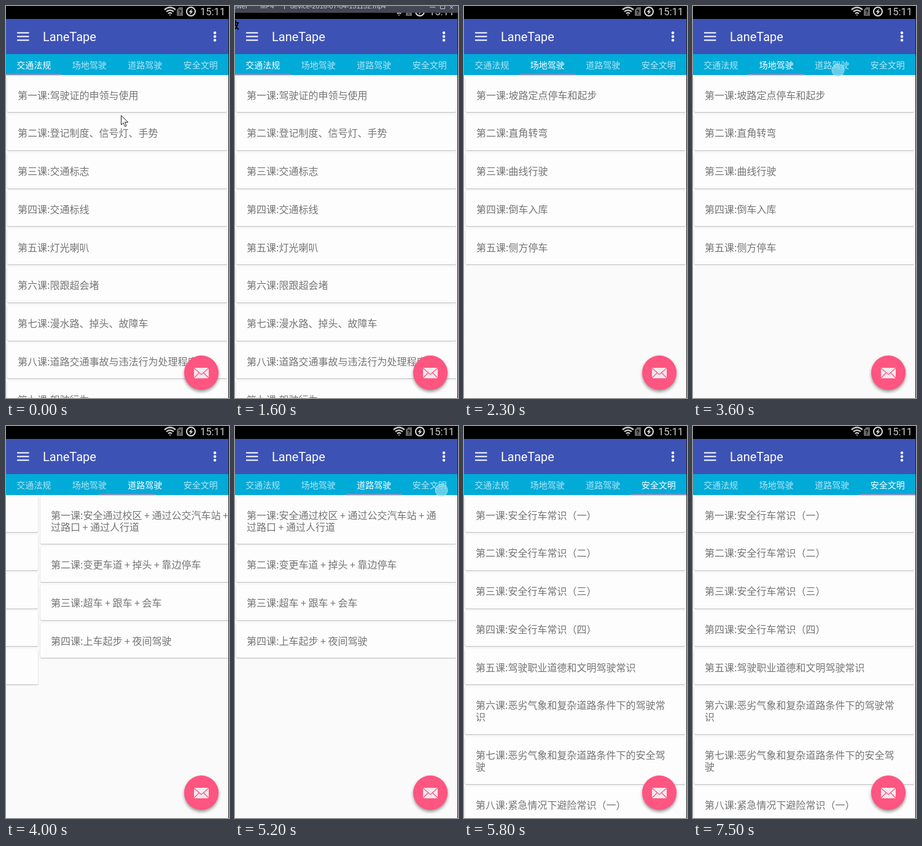
These frames come from a looping animation (363x636 px, 8000 ms). An HTML page:

```html
<!DOCTYPE html>
<html lang="zh-CN">
<head>
<meta charset="utf-8">
<title>Lessons</title>
<style>
  html, body { margin: 0; width: 100%; height: 100%; overflow: hidden; background: #fafafa; }
  #stage { position: absolute; left: 0; top: 0; width: 363px; height: 636px; overflow: hidden; background: #fafafa; }
  .page { position: absolute; left: 0; top: 115px; width: 362px; }
  .card {
    box-sizing: border-box; margin: 0 2px 4.75px; padding: 19.5px 0 18.5px 17px;
    border-radius: 2px; background: #fdfdfd; box-shadow: 0 1px 2px rgba(0, 0, 0, .27);
    font: 16px/19px "Noto Sans CJK SC", "Noto Sans CJK", sans-serif; color: #757575; white-space: pre;
  }
  .card span { font-family: "Noto Sans CJK TC", "Noto Sans CJK", sans-serif; line-height: 0; }
  svg { position: absolute; left: 0; top: 0; }
  .tab { font: 14px "Noto Sans CJK SC", "Noto Sans CJK", sans-serif; text-anchor: middle; fill: #fff; }
</style>
</head>
<body>
<div id="stage">
  <div id="pages"></div>
  <svg width="363" height="636" viewBox="0 0 363 636">
    <defs>
      <clipPath id="tabClip"><rect id="tabArea" y="78" width="90.5" height="34"/></clipPath>
      <filter id="soft" x="-30%" y="-30%" width="160%" height="160%"><feGaussianBlur stdDeviation="2.5"/></filter>
    </defs>

    <!-- Status bar -->
    <rect width="363" height="21" fill="#000"/>
    <g fill="none" stroke="#c8c8c8" stroke-width="2.400">
      <path d="M258 6Q267-1.500 276 6M261 9.200Q267 4.200 273 9.200M264 12.300Q267 9.800 270 12.300"/>
      <path d="M265.500 14H268.500L267 16Z" fill="#c8c8c8" stroke="none"/>
    </g>
    <path d="M282 2H288V16H278V6Z" fill="#666"/>
    <text x="280.500" y="14" font-family="Roboto, sans-serif" font-size="10" font-weight="700">?</text>
    <circle cx="301" cy="9" r="7" fill="none" stroke="#ddd" stroke-width="2"/>
    <path d="M303 4L297.500 10H300.500L299 14.500L304.500 8.500H301.500Z" fill="#ddd"/>
    <text x="316" y="15" font-family="Roboto, sans-serif" font-size="16.500" fill="#ccc">15:11</text>

    <!-- Toolbar -->
    <rect y="21" width="363" height="57" fill="#3d52b5"/>
    <path d="M18 43.500H37.500M18 49.500H37.500M18 55.500H37.500" stroke="#fff" stroke-width="2"/>
    <text x="60" y="57" font-family="Roboto, sans-serif" font-size="20" fill="#fff">LaneTape</text>
    <g fill="#fff">
      <circle cx="340" cy="43.500" r="2.200"/><circle cx="340" cy="49.500" r="2.200"/><circle cx="340" cy="55.500" r="2.200"/>
    </g>

    <!-- Tabs -->
    <rect y="78" width="363" height="34" fill="#00abd8"/>
    <circle id="ripple" cy="104" fill="#fff" fill-opacity=".18" clip-path="url(#tabClip)"/>
    <g id="tabs"></g>
    <rect id="indicator" y="111" width="90.500" height="1.500" fill="#dd85b4"/>
    <circle id="touch" cy="104" r="10" fill="#8edcf0" fill-opacity=".7" stroke="#b5ebf7" stroke-opacity=".8"/>

    <!-- Mail button -->
    <circle cx="318" cy="598" r="28" opacity=".4" filter="url(#soft)"/>
    <circle cx="318" cy="595" r="28" fill="#ff5581"/>
    <rect x="306" y="587" width="24" height="17" fill="#f3eaed"/>
    <path d="M306 587.500L318 598L330 587.500M306 603.500L314.500 595M330 603.500L321.500 595" fill="none" stroke="#ff5581" stroke-width="1.300"/>

    <rect x="362" width="1" height="636" fill="#1c1c1c"/>

    <!-- Player title bar -->
    <g id="player">
      <rect width="363" height="11" fill="#434754"/>
      <g font-family="Liberation Sans, sans-serif" font-size="11" fill="#c9cbd2">
        <text x="-3" y="4">ewer</text><text x="41" y="4">MP4</text>
        <text x="90" y="4">device-2016-07-04-151152.mp4</text>
      </g>
      <path d="M80.500 0V5M317 2H326M334.500 0V4.500H341.500V0M350 4.500L355 0M350 0L355 4.500" fill="none" stroke="#c9cbd2"/>
      <text x="-9" y="37" font-family="Noto Sans CJK SC, Noto Sans CJK, sans-serif" font-size="16" font-weight="700">放</text>
    </g>

    <path id="cursor" d="M.5 .5V16L4 12.500L6.500 18.500L9 17.500L6.500 11.500H11.500Z" fill="#fff" stroke="#222"/>
  </svg>
</div>
<script>
const LOOP = 8000, STEP = 100, PAGE_W = 362, TAB_W = 90.5;
const tabNames = ["交通法规", "场地驾驶", "道路驾驶", "安全文明"];
const lessons = [
  ["驾驶证的申领与使用", "登记制度、信号灯、手势", "交通标志", "交通标线", "灯光喇叭", "限跟超会堵",
   "漫水路、掉头、故障车", "道路交通事故与违法行为处理程序", "驾驶行为"],
  ["坡路定点停车和起步", "直角转弯", "曲线行驶", "倒车入库", "侧方停车"],
  ["安全通过校区 + 通过公交汽车站 + 通\n过路口 + 通过人行道", "变更车道 + 掉头 + 靠边停车", "超车 + 跟车 + 会车", "上车起步 + 夜间驾驶"],
  ["安全行车常识（一）", "安全行车常识（二）", "安全行车常识（三）", "安全行车常识（四）", "驾驶职业道德和文明驾驶常识",
   "恶劣气象和复杂道路条件下的驾驶常\n识", "恶劣气象和复杂道路条件下的安全驾\n驶", "紧急情况下避险常识（一）"]
];
// Each tap: finger down, then the pager starts to slide to the tab.
const taps = [
  { tab: 1, x: 140, down: 1700, slide: 1872 },
  { tab: 2, x: 236, down: 3600, slide: 3810 },
  { tab: 3, x: 336, down: 5200, slide: 5286 }
];

const el = id => document.getElementById(id);
const clamp = v => Math.min(1, Math.max(0, v));
const settle = p => 1 - (1 - p) ** 5;
const smooth = p => p * p * (3 - 2 * p);
const show = (node, on) => node.style.display = on ? "" : "none";
const set = (id, attrs) => { for (const k in attrs) el(id).setAttribute(k, attrs[k]); };

// Traditional Chinese glyphs centre the brackets in their cells.
const card = (name, i) =>
  `<div class="card">第${"一二三四五六七八九"[i]}课:${name.replace(/[（）]/g, '<span lang="zh-TW">$&</span>')}</div>`;
el("pages").innerHTML = lessons.map(list => `<div class="page">${list.map(card).join("")}</div>`).join("");
el("tabs").innerHTML = tabNames.map((name, i) =>
  `<text class="tab" x="${TAB_W * (i + .5)}" y="101">${name}</text>`).join("");
const pages = [...el("pages").children], tabs = [...el("tabs").children];

function drawCursor(t) {
  const p = clamp((t - 500) / 300);
  const [x, y] = t < 100 ? [187, 177] : [165 + 135 * p, 193 - 35 * p];
  set("cursor", { transform: `translate(${Math.round(x)} ${Math.round(y)})` });
  show(el("cursor"), t < 1600);
}

function drawTap(t) {
  const tap = taps.find(k => t >= k.down && t < k.slide + 150);
  show(el("ripple"), tap);
  show(el("touch"), tap && t < tap.slide);
  if (!tap) return;
  set("tabArea", { x: tap.tab * TAB_W });
  set("ripple", { cx: tap.x, r: 110 * clamp((t - tap.down) / 200) });
  set("touch", { cx: tap.x });
}

function draw(t) {
  let position = 0, line = 0, selected = 0;
  for (const { tab, slide } of taps) {
    position += settle(clamp((t - slide) / 600));
    line += smooth(clamp((t - slide - 128) / 100));
    if (t >= slide) selected = tab;
  }
  pages.forEach((page, i) => page.style.transform = `translateX(${Math.round((i - position) * PAGE_W)}px)`);
  tabs.forEach((tab, i) => tab.style.fillOpacity = i === selected ? 1 : .7);
  set("indicator", { x: line * TAB_W });
  show(el("player"), t >= 1600 && t < 2300);
  drawCursor(t);
  drawTap(t);
}

function tick() {
  draw(Math.floor(performance.now() % LOOP / STEP) * STEP);
  requestAnimationFrame(tick);
}
tick();
</script>
</body>
</html>
```
